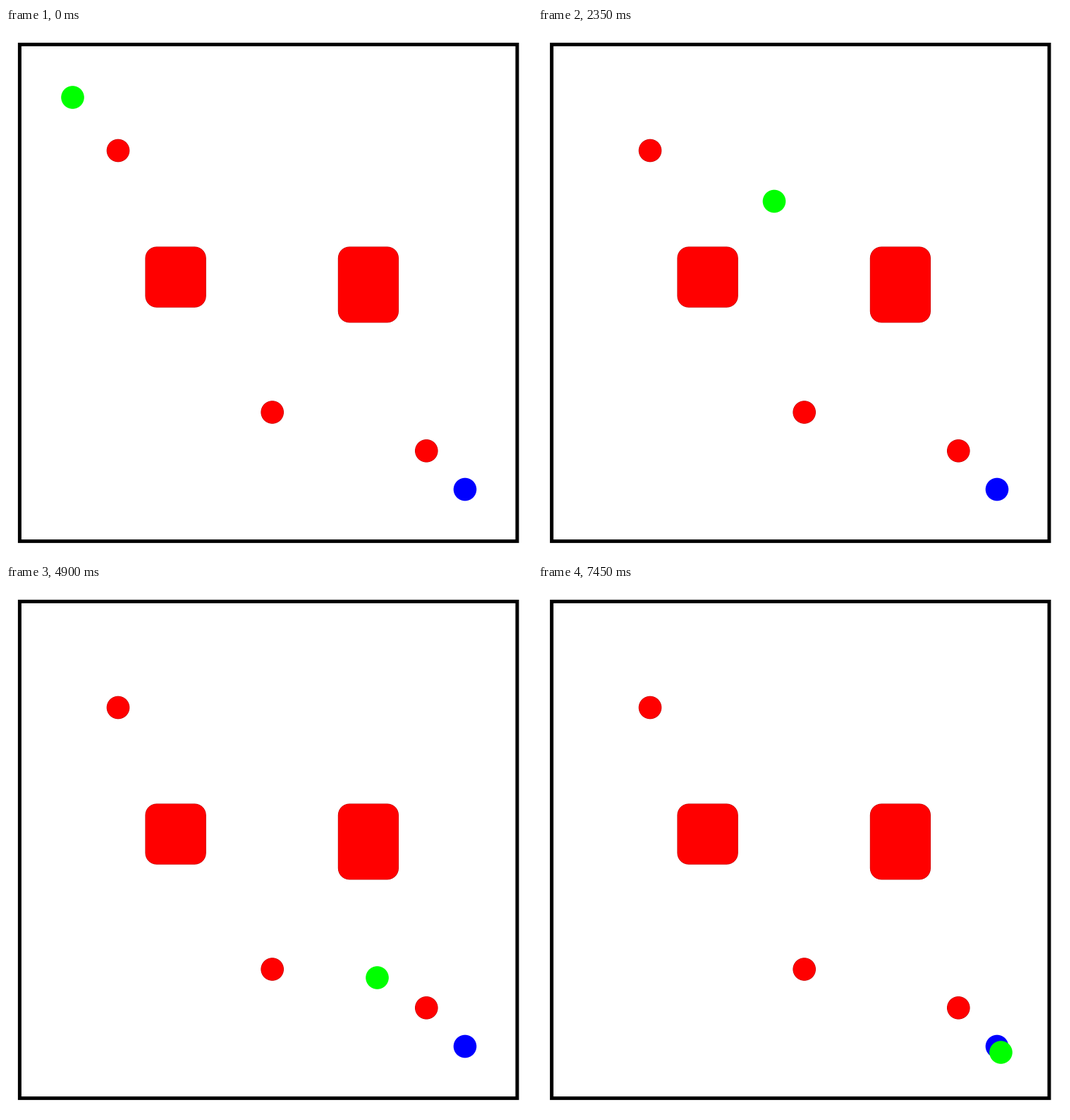
These frames come from a looping animation (746 by 751 pixels, 7500 ms). A matplotlib script:

```python
import numpy as np
import matplotlib.pyplot as plt
from matplotlib.animation import FuncAnimation
from matplotlib.patches import Circle, Rectangle

W, H, DPI = 746, 751, 64
STEP, LOOP = 50, 7500
PX = 72 / DPI
RADIUS = 16.3
RED, DARK_RED, GREEN, BLUE = "#ff0000", "#c00000", "#00ff00", "#0000ff"

# Key poses of the robot between the obstacles: time in ms -> x, y
KEYS = {
    0: (94.5, 98.5), 1200: (199.5, 115), 2350: (335, 246), 3850: (391, 444),
    4900: (526.5, 557.5), 5700: (537.5, 601), 6600: (580, 654),
    7450: (656.5, 663.5),
}
TIMES = np.array(list(KEYS), float)
POINTS = np.array(list(KEYS.values()))
SLOPES = np.gradient(POINTS, TIMES, axis=0)


def position(t):
    """Cubic Hermite curve through the key poses."""
    i = min(np.searchsorted(TIMES, t, side="right") - 1, len(TIMES) - 2)
    span = TIMES[i + 1] - TIMES[i]
    u = (t - TIMES[i]) / span
    ease = u * u * (3 - 2 * u)
    return (POINTS[i] * (1 - ease) + POINTS[i + 1] * ease
            + span * u * (1 - u) * (SLOPES[i] * (1 - u) - SLOPES[i + 1] * u))


def dot(x, y, color, radius=RADIUS):
    return ax.add_patch(Circle((x, y), radius, color=color, lw=0))


def box(x0, y0, x1, y1, width, join, edge, face="none"):
    ax.add_patch(Rectangle((x0, y0), x1 - x0, y1 - y0, fc=face, ec=edge,
                           lw=width * PX, joinstyle=join, snap=False))


def block(x0, y0, x1, y1):
    """Rectangle grown by the robot's radius, with a thin dark rim."""
    r = RADIUS
    for grow, color in ((0, DARK_RED), (-0.6, RED)):
        box(x0 + r, y0 + r, x1 - r, y1 - r, 2 * (r + grow), "round",
            color, color)


fig = plt.figure(figsize=(W / DPI, H / DPI), dpi=DPI, facecolor="white")
ax = fig.add_axes([0, 0, 1, 1])
ax.set_xlim(0, W)
ax.set_ylim(H, 0)
ax.axis("off")

box(19.4, 23.4, 725, 728.6, 5, "miter", "black")
block(197.4, 310.4, 283.8, 396.8)
block(470.8, 310.4, 557, 418.4)
for x, y in ((159, 174), (377.7, 545.5), (596.3, 600.3)):
    dot(x, y, DARK_RED)
    dot(x, y, RED, RADIUS - 0.6)
dot(651, 655, BLUE)
robot = dot(*POINTS[0], GREEN)


def update(frame):
    robot.center = position(frame * STEP)
    return robot,


anim = FuncAnimation(fig, update, frames=LOOP // STEP, interval=STEP,
                     repeat=True, repeat_delay=0, blit=False)
plt.show()
```
